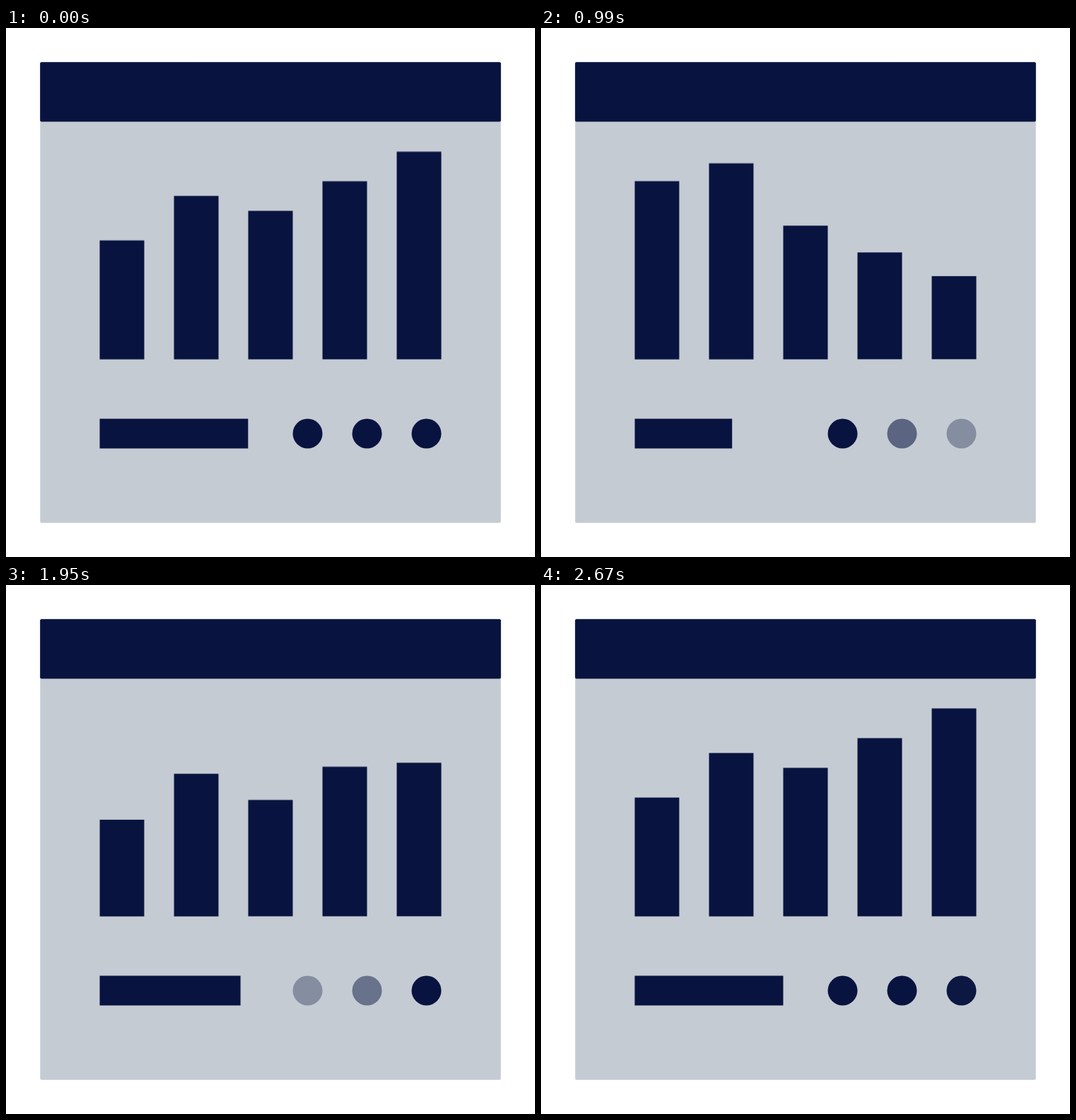
Recreate the animation shown at these times as an HTML page. Size 748 by 748 pixels, loop 2700 ms.

```html
<!DOCTYPE html>
<html lang="en">
<head>
<meta charset="utf-8">
<title>Dashboard</title>
<style>
  html, body { margin: 0; width: 100%; height: 100%; overflow: hidden; background: #fff; }
  svg { display: block; width: 100%; height: 100%; fill: #08143f; }
  .panel { fill: #c5cbd3; }

  /* --a, --b, --c: successive scales before returning to full size */
  .bar { transform-origin: 0 468.5px; animation: bar 2700ms linear infinite; }
  .line { transform-origin: 132.5px 0; animation: line 2700ms linear infinite; }
  .dot { animation: dot 1350ms ease-in-out infinite; }

  @keyframes bar {
    0% { transform: none; animation-timing-function: ease-out; }
    33.333%, 36.667% { transform: scaleY(var(--a)); animation-timing-function: ease-in; }
    63.333% { transform: scaleY(var(--b)); }
    72.222% { transform: scaleY(var(--c)); animation-timing-function: cubic-bezier(.333, .667, .667, 1); }
    95.85%, 100% { transform: none; }
  }
  @keyframes line {
    0% { transform: none; animation-timing-function: ease-out; }
    33.333%, 36.667% { transform: scaleX(.656); animation-timing-function: ease-in; }
    63.333% { transform: scaleX(.429); }
    72.222% { transform: scaleX(.948); animation-timing-function: cubic-bezier(.333, .667, .667, 1); }
    88.889%, 100% { transform: none; }
  }
  @keyframes dot {
    0%, 16.667% { opacity: 1; }
    33.333%, 50% { opacity: .335; }
    66.667%, 100% { opacity: 1; }
  }
</style>
</head>
<body>
<svg viewBox="0 0 748 748">
  <rect class="panel" x="48.3" y="48.3" width="651.4" height="651.4" rx="2"/>
  <rect x="48.2" y="48.2" width="651.6" height="84.3" rx="2"/>

  <rect class="bar" x="132.5" y="300.5" width="63" height="168" style="--a:1.5; --b:1.143; --c:.8125"/>
  <rect class="bar" x="237.5" y="237.5" width="63" height="231" style="--a:1.2; --b:.9545; --c:.872"/>
  <rect class="bar" x="342.5" y="258.5" width="63" height="210" style="--a:.9; --b:.676; --c:.783"/>
  <rect class="bar" x="447.5" y="216.5" width="63" height="252" style="--a:.6; --b:.641; --c:.839"/>
  <rect class="bar" x="552.5" y="174.5" width="63" height="294" style="--a:.4; --b:.4167; --c:.738"/>

  <rect class="line" x="132.5" y="552.5" width="210" height="42"/>

  <circle class="dot" cx="426.5" cy="573.5" r="21"/>
  <circle class="dot" cx="510.5" cy="573.5" r="21" style="animation-delay:-1125ms"/>
  <circle class="dot" cx="594.5" cy="573.5" r="21" style="animation-delay:-900ms"/>
</svg>
</body>
</html>
```
